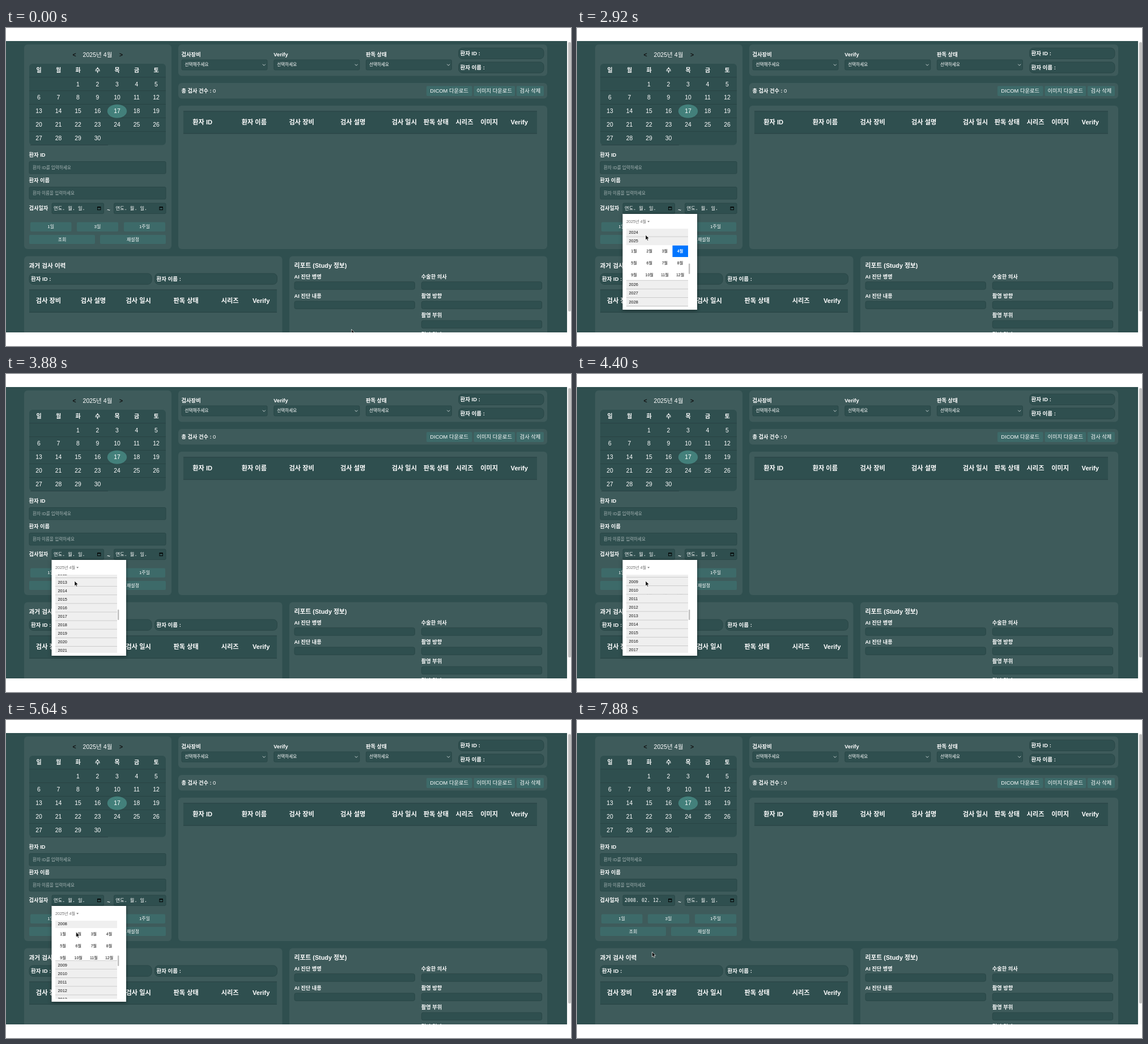
Animation of 997x561 px, one loop 8 s. Source, as an HTML page:

```html
<!DOCTYPE html>
<html lang="ko">
<head>
<meta charset="utf-8">
<title>검사 조회</title>
<style>
  html, body { margin: 0; width: 100%; height: 100%; overflow: hidden; background: #fff; }
  svg { display: block; width: 100vw; height: 100vh; }
  text { font-family: "Liberation Sans", "Noto Sans CJK KR", "Noto Sans CJK", sans-serif; fill: #fff; white-space: pre; }
  .b { font-weight: 700; }
  .c { text-anchor: middle; }
  .mono { font-family: "DejaVu Sans Mono", "Noto Sans CJK KR", "Noto Sans CJK", monospace; }
  .hint { fill: #a8b6b6; }
  .ink { fill: #111; }
  .dim { fill: #6c6c6c; }
  .link { fill: #0b66c9; }
  .panel { fill: #3e5b5b; }
  .dark { fill: #2f4f4f; }
  .field { fill: #2f4f4f; stroke: #284545; stroke-width: .8; }
  .btn { fill: #3d6a69; }
  .line { fill: #263f40; }
  .row { fill: #efefef; }
  .rule { fill: #bdbdbd; }
  .pick { fill: #0075ff; }
  .hover { fill: #bdd2f2; stroke: #23406e; stroke-width: 1; }
  .chev { fill: none; stroke: #d5dddd; stroke-width: .9; }
  .arrow { fill: none; stroke: #222; stroke-width: .9; }
  .pop { filter: drop-shadow(0 1px 3px rgba(0, 0, 0, .45)); }
</style>
</head>
<body>
<svg viewBox="0 0 997 561" preserveAspectRatio="none">
  <defs>
    <clipPath id="view"><rect y="23" width="997" height="514"/></clipPath>
    <clipPath id="list"><rect x="87" y="354" width="109" height="138"/></clipPath>
  </defs>
  <g id="stage" clip-path="url(#view)"></g>
</svg>
<script>
const stage = document.getElementById('stage');

function el(tag, attrs, parent) {
  const e = document.createElementNS('http://www.w3.org/2000/svg', tag);
  for (const k in attrs) e.setAttribute(k, attrs[k]);
  parent.appendChild(e);
  return e;
}
// box by its edges
const box = (cls, l, t, r, b, rx = 0, g = stage) =>
  el('rect', { class: cls, x: l, y: t, width: r - l, height: b - t, rx }, g);
// y is the middle of the line
const text = (s, x, y, size, cls = '', g = stage) => {
  const e = el('text', { class: cls, x, y: y + size * .36, 'font-size': size }, g);
  e.textContent = s;
  return e;
};
const path = (cls, d, g = stage) => el('path', { class: cls, d }, g);
const group = (attrs = {}, g = stage) => el('g', attrs, g);
const show = (e, on) => e.setAttribute('visibility', on ? 'visible' : 'hidden');

const WEEK = [...'일월화수목금토'];

// page
box('dark', 0, 23, 990, 537);
el('rect', { x: 990, y: 23, width: 7, height: 514, fill: '#fafafa' }, stage);
el('rect', { x: 992, y: 25, width: 5, height: 475, rx: 2, fill: '#c1c1c1' }, stage);
[[32, 29, 292, 390], [304, 29, 955, 84.5], [304, 97, 955, 124.5], [304, 137, 955, 390],
 [32, 402.5, 487.5, 550], [500, 402.5, 955, 550]].forEach(p => box('panel', ...p, 6));

// side calendar
text('<', 120.5, 47, 10.5, 'c b ink');
text('2025년 4월', 161.5, 47, 10.6, 'c');
text('>', 203, 47, 10.5, 'c b ink');
box('dark', 41, 63, 282, 206.5, 6);
const colX = i => 58 + i * 34.5;
WEEK.forEach((d, i) => text(d, colX(i), 74.3, 10, 'c b'));
for (let i = 0; i < 5; i++) box('line', 41, 86.5 + i * 23.9, 282, 87.2 + i * 23.9);
box('line', 43, 206, 180, 206.8);
el('ellipse', { cx: 196, cy: 146.7, rx: 17.2, ry: 12, fill: '#43807b' }, stage);
for (let d = 1; d <= 30; d++) {
  const n = d + 1;
  text(d, colX(n % 7), 98.8 + Math.floor(n / 7) * 23.9, 10.4, 'c');
}

// search form
text('환자 ID', 40.5, 223.5, 9.3, 'b');
box('field', 41, 235.5, 282, 257, 2);
text('환자 ID를 입력하세요', 47, 246, 7.6, 'hint');
text('환자 이름', 40.5, 268.7, 9.2, 'b');
box('field', 41, 280.5, 282, 302, 2);
text('환자 이름을 입력하세요', 47, 291.3, 7.6, 'hint');
text('검사일자', 40.5, 318, 9.2, 'b');
text('~', 181, 320.5, 9.5, 'c b');
for (const x of [81, 190.5]) {
  box('field', x, 309, x + 91.5, 327.5, 2);
  path('', `M${x + 80} 315.2h6.4v6h-6.4zM${x + 80.9} 316.9v3.4h4.6v-3.4z`).setAttribute('fill-rule', 'evenodd');
}
const from = text('', 84, 318, 8.3, 'mono');
text('연도. 월. 일.', 193.5, 318, 8.3, 'mono');
[['1일', 43, 342.5, 115.5, 359], ['3일', 125, 342.5, 198, 359], ['1주일', 208, 342.5, 281, 359],
 ['조회', 41, 365, 157, 381], ['재설정', 166, 365, 282, 381]].forEach(([s, l, t, r, b]) => {
  box('btn', l, t, r, b, 2);
  text(s, (l + r) / 2, (t + b) / 2 - .2, 8, 'c');
});

// filters
[['검사장비', '선택해주세요', 310], ['Verify', '선택하세요', 472.8], ['판독 상태', '선택하세요', 635.4]].forEach(([a, b, x]) => {
  text(a, x - .5, 46.3, 9.3, 'b');
  box('field', x, 56, x + 151, 74, 2);
  text(b, x + 5.5, 64.5, 7.6);
  path('chev', `M${x + 142.8} 63.8l2.5 2.5 2.5-2.5`);
});
const pill = (s, l, t, r) => {
  box('field', l, t, r, t + 19.3, 7);
  text(s, l + 3, t + 9.3, 9.5, 'b');
};
pill('환자 ID :', 798.5, 35.2, 949);
pill('환자 이름 :', 798.5, 60, 949);

// summary row
text('총 검사 건수 :', 309.5, 110.8, 9.2, 'b');
text('0', 365, 110.8, 9.5);
[['DICOM 다운로드', 742, 822.5], ['이미지 다운로드', 825.5, 898], ['검사 삭제', 901, 949]].forEach(([s, l, r]) => {
  box('btn', l, 102.3, r, 120, 2);
  text(s, (l + r) / 2, 110.8, 9.3, 'c');
});

function head(l, t, r, b, cols) {
  box('dark', l, t, r, b);
  box('line', l, t, r, t + .8);
  box('line', l, b - .8, r, b);
  cols.forEach(([s, x]) => text(s, x, (t + b) / 2 - .6, 11.2, 'c b'));
}
head(313, 146.5, 937, 186.5, [['환자 ID', 346.7], ['환자 이름', 437.8], ['검사 장비', 521.7], ['검사 설명', 612.2],
  ['검사 일시', 702.8], ['판독 상태', 758.8], ['시리즈', 809], ['이미지', 852.6], ['Verify', 905.8]]);

// history
text('과거 검사 이력', 40.5, 419.4, 10.7, 'b');
pill('환자 ID :', 41, 433, 257);
pill('환자 이름 :', 262.5, 433, 478.5);
head(41, 461.5, 478, 502, [['검사 장비', 75], ['검사 설명', 154], ['검사 일시', 233.7], ['판독 상태', 317.7],
  ['시리즈', 395.2], ['Verify', 450.2]]);

// report
text('리포트 (Study 정보)', 508.5, 419.6, 10.8, 'b');
[['AI 진단 병명', 509, 0], ['AI 진단 내용', 509, 1], ['수술한 의사', 733.3, 0], ['촬영 방향', 733.3, 1],
 ['촬영 부위', 733.3, 2], ['검사 일자', 733.3, 3]].forEach(([s, x, i]) => {
  const y = 438.4 + i * 34.2;
  text(s, x - .5, y, 9.2, 'b');
  box('field', x, y + 9.3, x + 212.3, y + 22.8, 3);
});

// date popup
const pop = group({ class: 'pop' });
el('rect', { x: 80.5, y: 328, width: 131.5, height: 169, fill: '#fff' }, pop);

const cellX = i => 95.5 + i * 16.92;
const cellY = i => 381 + i * 16.9;
const cell = (cls, c, r, g) => box(cls, cellX(c) - 8.4, cellY(r) - 8.4, cellX(c) + 8.4, cellY(r) + 8.4, 0, g);

function month(title, lead, days, sel) {
  const g = group({}, pop);
  text(title, 87, 341.3, 7.2, 'b ink', g);
  path('ink', 'M124.2 340.4h4l-2 2.3z', g);
  path('arrow', 'M177.5 347v-10M173.2 341.4l4.3-4.4 4.3 4.4M197 337v10M192.7 342.6l4.3 4.4 4.3-4.4', g);
  WEEK.forEach((d, i) => text(d, cellX(i), 363.4, 6.8, 'c ink', g));
  const hover = cell('hover', 0, 0, g);
  show(hover, false);
  for (let i = 0; i < 42; i++) {
    const d = i - lead + 1, c = i % 7, r = Math.floor(i / 7);
    const inside = d >= 1 && d <= days;
    if (d === sel) cell('pick', c, r, g);
    const n = d < 1 ? d + 31 : inside ? d : d - days;
    text(n, cellX(c), cellY(r), 7.2, 'c ' + (d === sel ? 'b' : inside ? 'ink' : 'dim'), g);
  }
  text('삭제', 93, 484, 6.9, 'link', g);
  text('오늘', 186, 484, 6.9, 'link', g);
  return { g, hover };
}
const april = month('2025년 4월', 2, 30, 17);
const feb = month('2008년 2월', 5, 29, 17);

// year list
const years = group({}, pop);
text('2025년 4월', 87, 341.3, 7.2, 'dim', years);
path('dim', 'M124.2 340.4h4l-2 2.3z', years);
box('rule', 197, 415.5, 199.4, 434, 1, years);
const clip = group({ 'clip-path': 'url(#list)' }, years);
const PITCH = 15.1, OPEN = 62;
const rows = [];
for (let y = 2000; y <= 2032; y++) {
  const g = group({}, clip);
  if (y === 2008 || y === 2025) {
    el('rect', { x: 87, y: 7.5, width: 109, height: OPEN, fill: '#fff' }, g);
    for (let m = 0; m < 12; m++) {
      const x = 100.5 + (m % 4) * 27.2, my = 18.3 + Math.floor(m / 4) * 20.6;
      const on = y === 2025 && m === 3;
      if (on) box('pick', x - 13.6, my - 10.2, x + 13.9, my + 10.2, 0, g);
      text(m + 1 + '월', x, my, 7.1, 'c ' + (on ? 'b' : 'ink'), g);
    }
  }
  box('row', 87, -7.6, 196, 7.6, 0, g);
  box('rule', 87, -7.8, 196, -7.1, 0, g);
  text(y, 91.5, 0, 7.4, 'ink', g);
  rows.push({ y, g });
}

const cursor = el('path', {
  d: 'M0 0V9L2 7.2 3.4 10.3 4.9 9.6 3.5 6.6H6.3Z',
  fill: '#000', stroke: '#fff', 'stroke-width': .7
}, stage);

// keys: [time, value, value...]
const ease = k => k * k * (3 - 2 * k);
const linear = k => k;
function at(keys, t, fn) {
  let i = 0;
  while (i < keys.length - 2 && t >= keys[i + 1][0]) i++;
  const [a, b] = [keys[i], keys[i + 1]];
  const k = fn(Math.min(1, Math.max(0, (t - a[0]) / (b[0] - a[0]))));
  return a.slice(1).map((v, j) => v + (b[j + 1] - v) * k);
}
const MOVE = [[0, 609.5, 531.5], [520, 609.5, 531.5], [720, 595, 518], [880, 595, 518], [1480, 160, 315],
  [1880, 160, 315], [2280, 110, 339], [2440, 110, 339], [2680, 121, 365], [4400, 121, 365], [4960, 121, 364],
  [5440, 121, 364], [5680, 124, 375], [6040, 124, 375], [6400, 122.5, 378], [6920, 122.5, 378],
  [7040, 128, 398], [7280, 128, 398], [7440, 129, 412], [7600, 129, 412], [7880, 132.5, 409]];
const SCROLL = [[0, 362], [2720, 362], [3400, 408], [3520, 426], [3880, 548.2], [4360, 607], [4960, 616.2]];
const GROW = [[5440, 0], [5680, OPEN]];
const T = { open: 1520, years: 2360, feb: 5840, close: 7560 };

function draw(t) {
  const [x, y] = at(MOVE, t, ease);
  cursor.setAttribute('transform', `translate(${x} ${y})`);
  from.textContent = t < T.feb ? '연도. 월. 일.' : t < T.close ? '2008. 02. 17.' : '2008. 02. 12.';

  const open = t >= T.open && t < T.close;
  pop.style.display = open ? '' : 'none';
  april.g.style.display = t < T.years ? '' : 'none';
  years.style.display = t >= T.years && t < T.feb ? '' : 'none';
  feb.g.style.display = t >= T.feb ? '' : 'none';

  const [base] = at(SCROLL, t, linear);
  const [grow] = at(GROW, t, ease);
  for (const r of rows) {
    const push = (r.y > 2025 ? OPEN : 0) + (r.y > 2008 ? grow : 0);
    r.g.setAttribute('transform', `translate(0 ${base + (r.y - 2025) * PITCH + push})`);
  }

  const c = Math.round((x - cellX(0)) / 16.92), w = Math.round((y - cellY(0)) / 16.9);
  const over = open && t >= T.feb && c >= 0 && c < 7 && w >= 0 && w < 6;
  show(feb.hover, over);
  if (over) {
    feb.hover.setAttribute('x', cellX(c) - 8);
    feb.hover.setAttribute('y', cellY(w) - 8.2);
  }
}

const start = performance.now();
function tick() {
  const t = (performance.now() - start) % 8000;
  draw(Math.floor(t / 40) * 40);
  requestAnimationFrame(tick);
}
tick();
</script>
</body>
</html>
```
